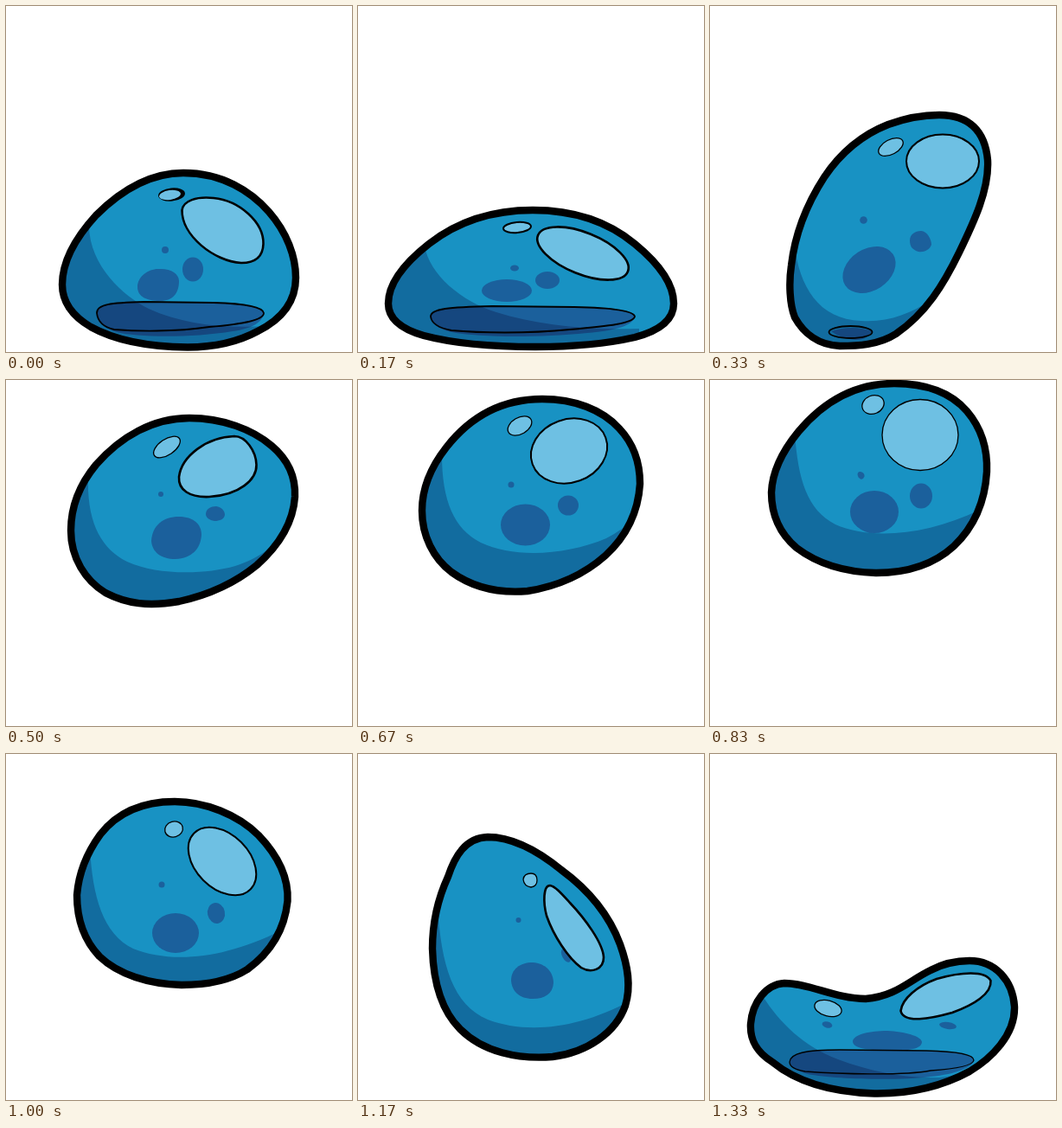
Write an HTML page without scripts that moves like this. It is 400 px wide and 400 px high and loops after 1490 ms.

```html
<!DOCTYPE html>
<html lang="en">
<head>
<meta charset="utf-8">
<title>Bouncing slime</title>
<style>
  html, body { margin: 0; width: 100%; height: 100%; overflow: hidden; background: #fff; }
  svg { display: block; width: 100%; height: 100%; overflow: hidden; }

  .body { fill: #1892c3; stroke: #000; stroke-width: 8.4; stroke-linejoin: round; }
  .spot { fill: #1b609c; }
  .shade { fill: #bfbdd0; mix-blend-mode: multiply; }
  .lip { fill: none; stroke: #000; stroke-width: 1.8; }
  .shine { fill: #6ec0e3; stroke: #000; stroke-width: 2; }
  .thin { stroke-width: 1.3; }
  .thick { stroke-width: 2.6; }
  .bare { stroke: none; }

  /* The poses stand side by side; the strip jumps one pose at a time. */
  .strip { animation: hop 1490ms step-end infinite; }
  @keyframes hop {
    0% { transform: translateX(0); }
    11.409% { transform: translateX(-400px); }
    22.148% { transform: translateX(-800px); }
    33.557% { transform: translateX(-1200px); }
    44.966% { transform: translateX(-1600px); }
    55.705% { transform: translateX(-2000px); }
    67.114% { transform: translateX(-2400px); }
    78.523% { transform: translateX(-2800px); }
    89.262%, 100% { transform: translateX(-3200px); }
  }
</style>
</head>
<body>
<svg viewBox="0 0 400 400">
  <defs>
    <clipPath id="c-rest"><use href="#rest"/></clipPath>
    <clipPath id="c-squash"><use href="#squash"/></clipPath>
    <clipPath id="c-stretch"><use href="#stretch"/></clipPath>
    <clipPath id="c-rise"><use href="#rise"/></clipPath>
    <clipPath id="c-float"><use href="#float"/></clipPath>
    <clipPath id="c-peak"><use href="#peak"/></clipPath>
    <clipPath id="c-tip"><use href="#tip"/></clipPath>
    <clipPath id="c-fall"><use href="#fall"/></clipPath>
    <clipPath id="c-land"><use href="#land"/></clipPath>
  </defs>

  <g class="strip">
    <g>
      <path id="rest" class="body" d="M205 193C250 193 283 214 304 238C325 262 335 290 335 314C335 341 319 362 291 376C265 390 238 394.500 210 394.500C165 394 125 386 98 371C76 358 65 342 65 322C65 292 84 264 104 242C135 211 170 193 205 193Z"/>
      <circle class="spot" cx="184" cy="282" r="4"/>
      <ellipse class="spot" cx="216" cy="304.500" rx="12" ry="14"/>
      <path class="spot" d="M152 325C152 313 164 304 176 304C190 303 200 309 200 318C200 332 193 341 178 341C163 341 152 336 152 325Z"/>
      <path class="spot" d="M105 355C105 345 120 343 160 342L240 343C280 344 297 349 298 355C297 365 285 373 262 376C215 384 150 383 128 377C112 372 106 365 105 355Z"/>
      <path class="shade" clip-path="url(#c-rest)" d="M96 255C97 300 135 335 165 350C205 368 250 373 305 370V400H50V255Z"/>
      <path class="lip" d="M105 355C105 345 120 343 160 342L240 343C280 344 297 349 298 355C298 364 270 368 235 371C195 377 150 376 125 374C112 371 106 365 105 355Z"/>
      <path class="shine thick" d="M203.500 236C205 225 220 220 240 222C270 225 298 250 297.500 275C297 290 288 297 272 297C240 295 203 265 203.500 236Z"/>
      <ellipse transform="translate(191.500 218) rotate(-6)" rx="15.500" ry="7.500"/>
      <ellipse class="shine bare" transform="translate(189.500 218.500) rotate(-8)" rx="12.500" ry="5.500"/>
    </g>

    <g transform="translate(400)">
      <path id="squash" class="body" d="M202 236C250 236 290 250 320 275C348 298 365 322 365 344C365 362 350 375 320 383C285 391 245 394 205 394C155 394 110 390 76 381C48 373 35 360 35 344C35 320 54 297 82 275C114 250 155 236 202 236Z"/>
      <ellipse class="spot" cx="181" cy="303" rx="5" ry="3.500"/>
      <ellipse class="spot" cx="219" cy="317" rx="14" ry="10"/>
      <ellipse class="spot" cx="172" cy="329" rx="29" ry="13"/>
      <path class="spot" d="M84 359C84 350 105 348 155 347L250 348C300 349 319 353 320 359C318 369 300 375 265 378C205 384 140 383 108 377C92 373 85 367 84 359Z"/>
      <path class="shade" clip-path="url(#c-squash)" d="M77 277C82 310 120 342 160 354C205 368 260 375 325 373V400H20V277Z"/>
      <path class="lip" d="M84 359C84 350 105 348 155 347L250 348C300 349 319 353 320 359C318 367 290 370 245 374C195 379 140 378 108 375C92 372 85 367 84 359Z"/>
      <ellipse class="shine thick" transform="translate(260 286) rotate(22)" rx="56" ry="24"/>
      <ellipse class="shine" transform="translate(184 256) rotate(-5)" rx="16" ry="6"/>
    </g>

    <g transform="translate(800)">
      <path id="stretch" class="body" d="M265 126C300 126 318 145 321 178C323 212 305 250 288 285C270 322 250 355 215 379C195 392 170 393 150 393C125 392 108 378 98 360C92 345 91 320 94 300C98 265 110 232 132 198C152 168 178 148 206 137C228 129 248 126 265 126Z"/>
      <circle class="spot" cx="177.500" cy="247.500" r="4.300"/>
      <path class="spot" d="M231 271C231 264 237 260 244 260C251 260 256 270 256 276C254 282 247 285 241 284C234 282 231 278 231 271Z"/>
      <ellipse class="spot" transform="translate(184 305) rotate(-33)" rx="33" ry="24"/>
      <path class="spot" d="M140 376Q165 368 187 376Q182 386 168 386Q150 384 140 376Z"/>
      <path class="shade" clip-path="url(#c-stretch)" d="M97 275C104 325 125 362 175 364C205 366 232 356 255 340V400H80V275Z"/>
      <ellipse class="lip" cx="162.500" cy="377" rx="25" ry="7"/>
      <ellipse class="shine" cx="269" cy="179.500" rx="42" ry="31"/>
      <ellipse class="shine thin" transform="translate(209 163) rotate(-28)" rx="15.500" ry="8.500"/>
    </g>

    <g transform="translate(1200)">
      <path id="rise" class="body" d="M212 44C250 44 285 57 307 76C326 92 335 112 334 135C332 165 317 190 290 214C262 237 232 249 200 256C165 262 140 259 115 246C92 232 75 206 75 174C75 147 85 121 104 98C133 65 170 44 212 44Z"/>
      <circle class="spot" cx="179" cy="132" r="3"/>
      <path class="spot" d="M231 155C231 149 237 146 243 146C249 147 253 151 253 156C252 161 247 163 241 163C235 162 231 159 231 155Z"/>
      <path class="spot" d="M168 186C169 168 182 158 200 158C217 158 226 167 226 179C225 195 215 206 196 207C179 207 169 199 168 186Z"/>
      <path class="shade" clip-path="url(#c-rise)" d="M95 110C93 165 110 195 140 210C175 226 230 225 265 215C293 206 315 189 328 172L345 280H60V110Z"/>
      <path class="shine thick" d="M264 65C277 65 289 82 289.500 98C290 115 270 133 235 135C212 136 199 127 200 112C203 88 232 66 264 65Z"/>
      <ellipse class="shine thin" transform="translate(186 77.500) rotate(-34)" rx="17.500" ry="9"/>
    </g>

    <g transform="translate(1600)">
      <path id="float" class="body" d="M213 22C250 22 282 34 302 56C319 74 326 96 326 120C324 152 311 180 286 203C260 226 228 239 196 244C160 247 130 238 108 222C87 206 74 180 74 151C74 125 84 101 102 78C130 42 167 22 213 22Z"/>
      <circle class="spot" cx="177" cy="121" r="3.500"/>
      <ellipse class="spot" cx="243" cy="145" rx="12" ry="11.500"/>
      <ellipse class="spot" cx="193.500" cy="167.500" rx="28.500" ry="24"/>
      <path class="shade" clip-path="url(#c-float)" d="M97 86C97 140 111 172 142 188C180 206 240 203 287 183Q305 174 322 158L340 260H60V86Z"/>
      <ellipse class="shine" transform="translate(244 82) rotate(-20)" rx="45" ry="36.500"/>
      <ellipse class="shine thin" transform="translate(187 53) rotate(-30)" rx="15" ry="9.500"/>
    </g>

    <g transform="translate(2000)">
      <path id="peak" class="body" d="M213 4C250 4 278 14 297 36C314 56 321 80 320 106C318 140 305 170 282 192C258 214 225 223 192 223C155 222 125 213 100 194C80 177 71 155 71 130C72 105 84 82 102 60C132 24 168 4 213 4Z"/>
      <path class="spot" d="M170.500 109Q171 105.500 174 106Q179 107 178.500 111.500Q177 115.500 174 114.500Q171 113 170.500 109Z"/>
      <ellipse class="spot" cx="244" cy="134" rx="13" ry="14.500"/>
      <ellipse class="spot" cx="190" cy="152.500" rx="28" ry="24.500"/>
      <path class="shade" clip-path="url(#c-peak)" d="M98 62C102 115 112 150 145 167C185 185 250 180 312 150L330 240H50V62Z"/>
      <ellipse class="shine thin" cx="243" cy="63.500" rx="44" ry="41"/>
      <ellipse class="shine thin" transform="translate(188.500 28.500) rotate(-22)" rx="13" ry="10.500"/>
    </g>

    <g transform="translate(2400)">
      <path id="tip" class="body" d="M195 55C230 55 268 70 292 94C314 117 327 143 325.500 170C322 204 305 230 279 249C257 263 228 267 203 267C165 266 130 255 108 234C90 215 82 190 82 163C84 138 93 115 109 93C130 66 160 55 195 55Z"/>
      <circle class="spot" cx="180" cy="151" r="3.500"/>
      <ellipse class="spot" transform="translate(243 184) rotate(-12)" rx="10" ry="12"/>
      <ellipse class="spot" cx="196" cy="207" rx="27" ry="23"/>
      <path class="shade" clip-path="url(#c-tip)" d="M97 108C100 165 112 208 147 225C190 242 250 238 318 204L340 290H60V108Z"/>
      <ellipse class="shine" transform="translate(250 124) rotate(45)" rx="46" ry="31"/>
      <ellipse class="shine thin" transform="translate(194 87) rotate(-15)" rx="10.500" ry="9"/>
    </g>

    <g transform="translate(2800)">
      <path id="fall" class="body" d="M150 96C180 96 208 112 235 134C265 156 290 185 303 220C312 245 316 268 309 291C298 322 265 345 225 350C185 353 145 345 118 318C96 296 87 262 86 225C86 195 92 168 104 142C112 118 124 97 150 96Z"/>
      <circle class="spot" cx="185.500" cy="192" r="3"/>
      <ellipse class="spot" transform="translate(240.500 233) rotate(-28)" rx="4.500" ry="8.500"/>
      <path class="spot" d="M177 262C177 249 187 241 202 241C217 242 226 252 226 265C225 277 216 283 202 283C186 283 178 274 177 262Z"/>
      <path class="shade" clip-path="url(#c-fall)" d="M92 175C96 245 110 290 150 307C195 324 255 318 315 285L330 370H70V175Z"/>
      <path class="shine thick" d="M222 152C214 152 214 172 218 187C226 210 243 236 258 247C270 254 284 249 284 235C283 218 262 190 245 172C235 161 228 153 222 152Z"/>
      <path class="shine thin" d="M191 145Q192 138 200 138Q207 138 207 146Q207 153 200 154Q192 153 191 145Z"/>
    </g>

    <g transform="translate(3200)">
      <path id="land" class="body" d="M300 239C330 239 350 262 352 292C353 325 325 352 300 367C265 386 230 393 190 392.500C140 391 100 379 72 356C53 344 46 330 47 312C49 287 65 266 86 265C115 265 145 283 180 283C215 280 230 262 255 250C270 242 285 239 300 239Z"/>
      <ellipse class="spot" transform="translate(135.500 313) rotate(15)" rx="6" ry="3.500"/>
      <ellipse class="spot" transform="translate(275 314) rotate(8)" rx="10" ry="4"/>
      <path class="spot" d="M165 332C166 324 185 320 205 320C225 321 244 326 245 333C244 341 232 343 205 343C180 342 165 340 165 332Z"/>
      <path class="spot" d="M92 356C93 346 110 342 150 342L250 343C290 344 305 348 305 354C304 362 285 370 255 373C215 378 145 376 113 370C98 366 92 361 92 356Z"/>
      <path class="shade" clip-path="url(#c-land)" d="M61 280C80 310 108 338 148 353C185 367 225 375 265 374C300 371 328 354 348 325V410H30V280Z"/>
      <path class="lip thin" d="M92 356C93 346 110 342 150 342L250 343C290 344 305 348 305 354C304 360 285 364 255 366C225 372 150 370 110 367C98 365 92 361 92 356Z"/>
      <path class="shine thick" d="M220.500 297C222 283 240 268 262 260C290 252 318 250 324.500 262C326 277 305 290 280 299C255 306 224 312 220.500 297Z"/>
      <ellipse class="shine thin" transform="translate(136.500 294) rotate(15)" rx="16" ry="9"/>
    </g>
  </g>
</svg>
</body>
</html>
```
